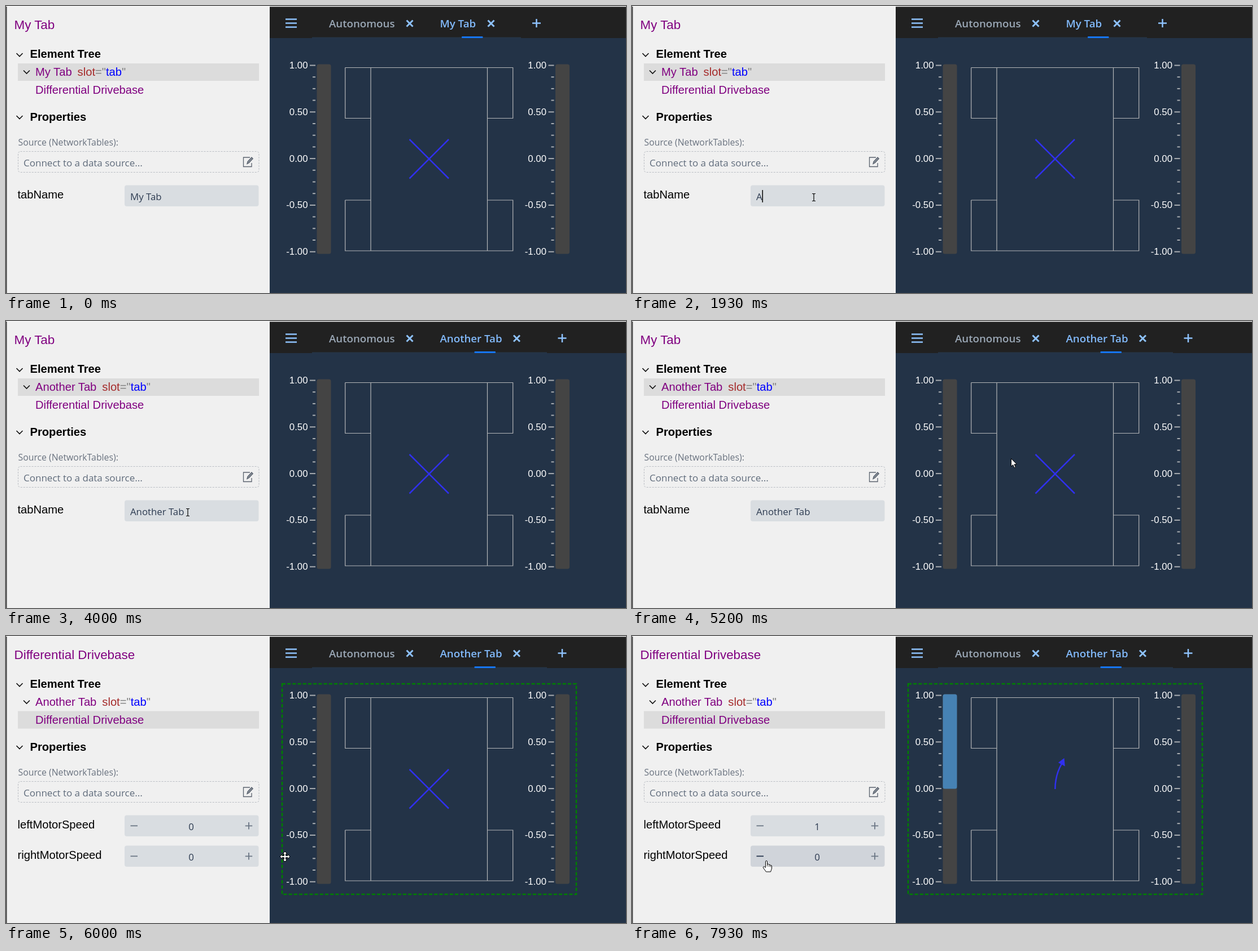
An HTML page for the animation above (8000 ms loop, 1098 px wide and 510 px high).

```html
<!DOCTYPE html>
<html lang="en">
<head>
<meta charset="utf-8">
<title>Dashboard editor</title>
<style>
html, body { margin: 0; width: 100%; height: 100%; overflow: hidden; background: #f0f0f0; }
svg { display: block; width: 1098px; height: 510px; }
text { font-family: "Liberation Sans", Arial, sans-serif; font-size: 20.16px; white-space: pre; }
.ui { font-family: "Open Sans", "Noto Sans", sans-serif; }
.tab { font-size: 18.7px; font-weight: 600; }
.val { font-size: 16.8px; font-weight: 500; fill: #2c3a50; }
.head { font-weight: bold; }
.scale { font-size: 16.8px; fill: #fff; text-anchor: end; }
.purple { fill: purple; }
.line { fill: none; stroke: #b4b6b8; stroke-width: 1.2; }
.icon { fill: none; stroke: #8ec2fd; stroke-width: 3; }
.chev { fill: none; stroke: #111; stroke-width: 1.7; }
.cur { fill: #fff; stroke: #000; stroke-width: 1; stroke-linejoin: round; }
</style>
</head>
<body>
<svg id="stage" viewBox="0 0 1098 510">
  <rect width="1098" height="510" fill="#f0f0f0"/>
  <rect x="467" y="57" width="631" height="453" fill="#233347"/>
  <rect x="467" width="631" height="57" fill="#212121"/>
  <rect width="1098" height="1.3" fill="#fafafa"/>
  <rect y="1" width="1.5" height="509" fill="#3c3c3c"/>

  <!-- side panel -->
  <text id="title" class="purple" x="14.5" y="40.5" style="font-size:22.4px"></text>
  <rect id="row" x="21" width="427" height="31" fill="#dcdcdc"/>
  <path class="chev" d="M18.5 84l5.5 5.5 5.5-5.5M18.5 195l5.5 5.5 5.5-5.5M31 114.500l5.500 5.500 5.500-5.500"/>
  <text class="head" x="42.500" y="92">Element Tree</text>
  <text x="52" y="124"><tspan id="node" class="purple"></tspan><tspan dx="10" fill="#a52a2a">slot</tspan><tspan fill="#808080">="</tspan><tspan fill="#0000ff">tab</tspan><tspan fill="#808080">"</tspan></text>
  <text class="purple" x="52" y="156">Differential Drivebase</text>
  <text class="head" x="42.500" y="203.500">Properties</text>
  <text class="ui" x="21.500" y="248" fill="#69727f" style="font-size:15.8px">Source (NetworkTables):</text>
  <rect x="21.500" y="258.500" width="426.500" height="37" rx="4" fill="none" stroke="#b9bdc3" stroke-dasharray="3 2"/>
  <text class="ui" x="31" y="284.500" fill="#5f6b7b" style="font-size:17px">Connect to a data source...</text>
  <g fill="none" stroke="#59616d" stroke-width="1.300">
    <path d="M432 269H420.500V285.500H435V279"/>
    <path d="M427 280.500l1-4 7-7.500 2.200 2.200-7 7.500z" fill="#8b929c"/>
  </g>

  <g id="tabProps">
    <text x="20.500" y="342">tabName</text>
    <rect id="field" x="210" y="318.500" width="237.500" height="37.500" rx="4"/>
    <path id="patch" d="M373.500 318.500h70a4 4 0 0 1 4 4v29.500a4 4 0 0 1 -4 4h-70z" fill="#d0d4da"/>
    <rect id="mark" y="327" height="22" fill="#0078d7"/>
    <text id="value" class="ui val" x="220" y="345"></text>
    <text id="marked" class="ui val" y="345" style="fill:#fff"></text>
    <rect id="caret" y="327" width="1.600" height="22" fill="#111"/>
  </g>
  <g id="motorProps"></g>

  <!-- tab bar -->
  <path class="icon" d="M495 23.500h20M495 30.500h20M495 37.500h20" style="stroke-width:2.600"/>
  <rect id="track" x="542" y="55.500" height="1.500" fill="#263648"/>
  <rect id="under" y="54" width="37.500" height="3" rx="1" fill="#1676f3"/>
  <text class="ui tab" x="572" y="37.500" fill="#9aa7b5">Autonomous</text>
  <text id="tabText" class="ui tab" x="768.500" y="37.500" fill="#82bafb"></text>
  <path class="icon" d="M709.500 25.500l11 11m0-11l-11 11"/>
  <g id="tabIcons"><path class="icon" d="M853.500 25.500l11 11m0-11l-11 11"/>
  <path class="icon" d="M932 30.500h15M939.500 23v15" style="stroke-width:2.500"/></g>

  <!-- drive base -->
  <g id="gauges"></g>
  <rect id="fill" x="550.500" y="103.500" width="25" height="168" rx="3.500" fill="#4682b4"/>
  <path class="line" d="M600.700 109.500H897.700V199.500H852.500M600.700 109.500V199.500H646M600.700 345H646M600.700 345V435H897.700V345H852.500M646 109.500V435M852.500 109.500V435"/>
  <path id="cross" d="M714.500 237l69.500 69.500m0-69.500l-69.500 69.500" stroke="#3030f0" stroke-width="2.500"/>
  <g id="arrow">
    <path d="M749.300 272Q749.500 247 761 227" fill="none" stroke="#3030f0" stroke-width="2.500"/>
    <path d="M765.500 217l1.300 14.500-12-6.500z" fill="#3030f0"/>
  </g>
  <rect id="outline" x="489" y="85" width="521" height="374" fill="none" stroke="#008000" stroke-width="2.500" stroke-dasharray="6 3.200"/>

  <g id="pointer">
    <path id="arrowCur" class="cur" d="M.5 .5V14.500L3.700 11.500 6 16.800 8.300 15.800 6 10.700H10.500Z"/>
    <path id="beamCur" d="M-3 -6.500H-.8L0 -5.700 .8 -6.500H3M0 -5.700V5.700M-3 6.500H-.8L0 5.700 .8 6.500H3" fill="none" stroke="#000" stroke-width="1.200"/>
    <path id="moveCur" class="cur" d="M0 -9L4 -5H1.500V-1.500H5V-4L9 0 5 4V1.500H1.500V5H4L0 9-4 5H-1.500V1.500H-5V4L-9 0-5 -4V-1.500H-1.500V-5H-4Z"/>
    <g id="handCur">
      <path class="cur" d="M-1.500 11V1.300Q-1.500 0 0 0T1.500 1.300V6Q4.500 5 4.700 7 7.200 6.300 7.300 8 9.500 7.500 9.500 9.500V13.500L7.500 19.500H-.5L-5.500 12.500Q-6.300 10.800-4.800 10.200-3.300 10-1.500 12Z"/>
      <path d="M1.500 6V10M4.700 7V10.500M7.300 8V11" stroke="#000" stroke-width=".9"/>
    </g>
  </g>
</svg>
<script>
const $ = id => document.getElementById(id);
const set = (el, attrs) => { for (const k in attrs) el.setAttribute(k, attrs[k]); };
const show = (id, on) => set($(id), { visibility: on ? "visible" : "hidden" });
const LOOP = 8000, STEP = 200 / 3;
const LIGHT = "#d9dde1", DARK = "#d0d4da", NAME = "Another Tab", START = "My Tab";

// Moments of the story, ms
const T = { enter: 66, focus: 1000, word: 1200, all: 1330, rename: 4000, pick: 5330, move: 5660, speed: 6930 };
const keysAt = [1930, 2130, 2330, 2400, 2470, 2530, 2670, 2730, 3000, 3200, 3330];

// Pointer path: time, x, y, eased?
const path = [
  [66, 1088, 497], [270, 690, 415], [470, 350, 355], [600, 230, 341], [730, 270, 340], [866, 322, 340],
  [4600, 322, 340], [5200, 671, 244, 1], [5600, 671, 244], [6000, 494, 392], [6150, 340, 386],
  [6267, 240, 360], [6460, 332, 344], [6800, 414.500, 332.500], [7400, 414.500, 332.500], [7933, 238, 399.500, 1]
];

function pointAt(t) {
  const i = path.findIndex(p => p[0] > t);
  if (i < 0) return path[path.length - 1].slice(1, 3);
  if (i === 0) return path[0].slice(1, 3);
  const a = path[i - 1], b = path[i];
  let k = (t - a[0]) / (b[0] - a[0]);
  if (b[3]) k = k * k * (3 - 2 * k);
  return [a[1] + (b[1] - a[1]) * k, a[2] + (b[2] - a[2]) * k];
}

const pen = document.createElement("canvas").getContext("2d");
function widthOf(s) {
  pen.font = '500 16.8px "Open Sans", "Noto Sans", sans-serif';
  return pen.measureText(s).width;
}

function gauge(x) {
  let s = `<rect x="${x + 12.500}" y="103.500" width="25" height="337" rx="3.500" fill="#444"/>`;
  for (let i = 0; i <= 16; i++) {
    const y = 105.500 + i * 20.700, major = i % 4 === 0;
    s += `<path d="M${x + 10} ${y}h${major ? -10 : -5}" stroke="#a9adb1" stroke-width="2"/>`;
    if (major) s += `<text class="scale" x="${x - 3.500}" y="${y + 5.500}">${(1 - i / 8).toFixed(2)}</text>`;
  }
  return s;
}
$("gauges").innerHTML = gauge(538) + gauge(960.500);

const rows = [318.500, 372.500];
$("motorProps").innerHTML = rows.map((y, i) => `
  <text x="20.500" y="${y + 23.300}">${["left", "right"][i]}MotorSpeed</text>
  <rect id="box${i}" x="210" y="${y}" width="237.500" height="37.500" rx="4"/>
  <path id="minus${i}" d="M220.500 ${y + 18.800}h12.500" stroke-width="1.800"/>
  <path id="plus${i}" d="M423.700 ${y + 18.800}h12.500m-6.250 -6.250v12.500" fill="none" stroke-width="1.800"/>
  <text id="num${i}" class="ui val" x="328" y="${y + 26.500}" text-anchor="middle">0</text>`).join("");

function drawField(t, hover) {
  const typed = keysAt.filter(k => t >= k).length;
  const text = typed ? NAME.slice(0, typed) : START;
  const from = typed || t < T.word ? -1 : t < T.all ? 3 : 0;
  $("value").textContent = text;
  $("marked").textContent = from < 0 ? "" : text.slice(from);
  const x = 220 + (from > 0 ? widthOf(text.slice(0, from)) : 0);
  set($("marked"), { x });
  set($("mark"), { x, width: from < 0 ? 0 : 220 + widthOf(text) - x });
  set($("field"), { fill: hover && t < T.focus ? DARK : LIGHT });
  set($("caret"), { x: 219.800 + widthOf(text) });
  const caret = t >= T.focus && from < 0 && (t < 3870 || t >= 4400 && t < 4930);
  $("caret").style.display = caret ? "" : "none";
  $("patch").style.display = t >= T.focus && t < T.word ? "" : "none";
}

function draw(t) {
  const picked = t >= T.pick, renamed = t >= T.rename, fast = t >= T.speed;
  const name = renamed ? NAME : START;
  const [x, y] = pointAt(Math.floor((t + 4) / STEP) * STEP);
  const over = x > 210 && x < 447.500 ? rows.findIndex(r => y > r && y < r + 37.500) : -1;

  $("title").textContent = picked ? "Differential Drivebase" : START;
  $("node").textContent = $("tabText").textContent = name;
  set($("row"), { y: picked ? 133.500 : 102 });
  set($("tabIcons"), { transform: `translate(${renamed ? 45.500 : 0} 0)` });
  set($("track"), { width: renamed ? 416 : 370 });
  set($("under"), { x: renamed ? 829.500 : 807 });

  $("tabProps").style.display = picked ? "none" : "";
  $("motorProps").style.display = picked ? "" : "none";
  if (!picked) drawField(t, over === 0);
  rows.forEach((_, i) => {
    const on = over === i;
    set($("box" + i), { fill: on ? DARK : LIGHT });
    set($("minus" + i), { stroke: on && x < 244 ? "#25344c" : "#6c7785" });
    set($("plus" + i), { stroke: on && x > 412 ? "#25344c" : "#6c7785" });
  });
  $("num0").textContent = fast ? 1 : 0;

  show("outline", picked);
  show("fill", fast);
  show("arrow", fast);
  show("cross", !fast);

  let kind = "arrow";
  if (x > 488 && t >= T.move) kind = "move";
  else if (picked && over >= 0) kind = x < 244 || x > 412 ? "hand" : "beam";
  else if (over === 0) kind = "beam";
  for (const k of ["arrow", "beam", "move", "hand"]) show(k + "Cur", k === kind && t >= T.enter);
  set($("pointer"), { transform: `translate(${x} ${y})` });
}

const begin = performance.now();
function tick() {
  draw((performance.now() - begin) % LOOP);
  requestAnimationFrame(tick);
}
tick();
</script>
</body>
</html>
```
